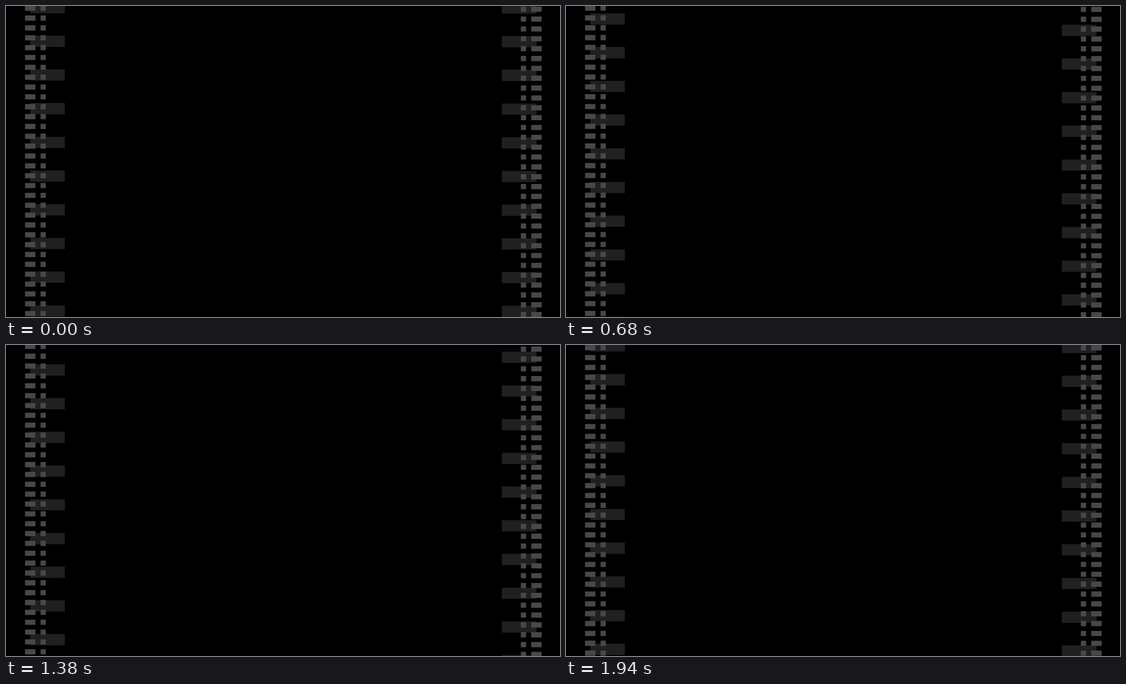
Recreate the animation shown at these times as an HTML page. Size 998 by 561 pixels, loop 1.96 s.

```html
<!DOCTYPE html>
<html lang="en">
<head>
<meta charset="utf-8">
<title>Sliding dashes</title>
<style>
  html, body { margin: 0; width: 100%; height: 100%; overflow: hidden; background: #000; }
  svg { display: block; width: 998px; height: 561px; }
  .bar { stroke: #202020; stroke-width: 62.3; stroke-dasharray: 20.2 40.6; }
  .tick { stroke: #484848; stroke-dasharray: 9.36 8.41; }
  .wide { stroke-width: 18.7; }
  .slim { stroke-width: 9.4; }
</style>
</head>
<body>
<svg viewBox="0 0 998 561">
  <path class="bar" data-start="53.5" data-turns="1" d="M74.8 0V561"/>
  <path class="tick wide" data-start="17.1" data-turns="-3" d="M43.6 0V561"/>
  <path class="tick slim" data-start="17.1" data-turns="-3" d="M67 0V561"/>
  <path class="bar" data-start="54.3" data-turns="-1" d="M924.4 0V561"/>
  <path class="tick slim" data-start="1.2" data-turns="3" d="M932.2 0V561"/>
  <path class="tick wide" data-start="1.2" data-turns="3" d="M955.6 0V561"/>
</svg>
<script>
  const LOOP = 1960, STEPS = 59;
  const PITCH = { bar: 60.8, tick: 17.77 };

  const lines = [...document.querySelectorAll('path')].map(el => ({
    el,
    start: +el.dataset.start,
    travel: el.dataset.turns * PITCH[el.classList[0]]
  }));

  // Three steps per 100 ms, on a 20 ms grid with one late step past the middle.
  function stepAt(ms) {
    const tick = Math.floor(ms / 20);
    return tick < 55 ? Math.floor(3 * tick / 5) : Math.ceil(3 * tick / 5) - 1;
  }

  function draw(ms) {
    const progress = stepAt(ms % LOOP) / STEPS;
    for (const { el, start, travel } of lines) {
      el.style.strokeDashoffset = -(start + travel * progress);
    }
  }

  const begin = performance.now();
  function tick() {
    draw(performance.now() - begin);
    requestAnimationFrame(tick);
  }
  tick();
</script>
</body>
</html>
```
